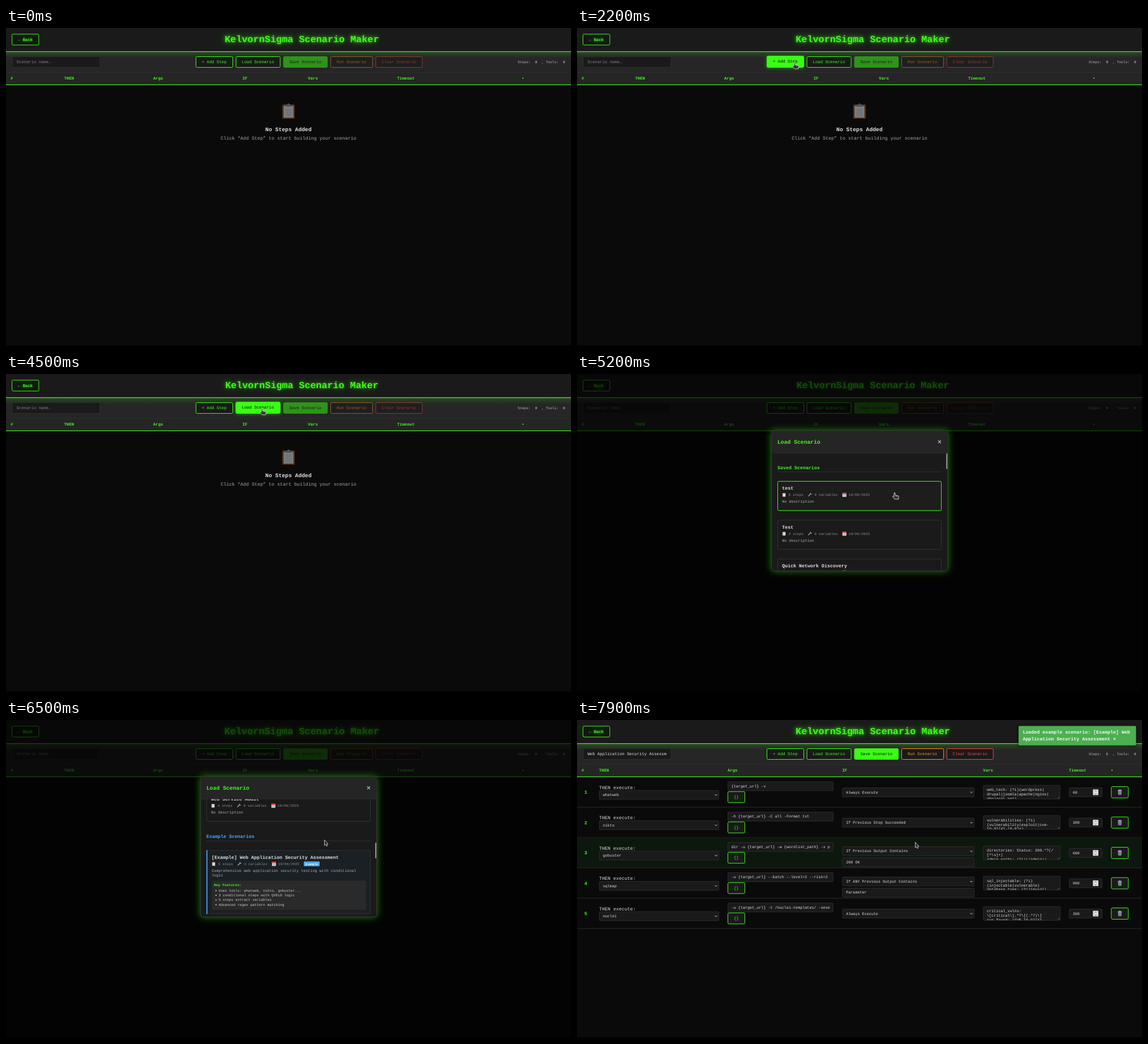
These frames come from a looping animation (998x561 px, 8000 ms). An HTML page:

```html
<!DOCTYPE html>
<html lang="en">
<head>
<meta charset="utf-8">
<title>Scenario Maker</title>
<style>
html, body { margin: 0; width: 100%; height: 100%; overflow: hidden; background: #0a0a0a; }
#stage { display: block; width: 100vw; height: 100vh; }
text { font-family: "Liberation Mono", "Courier New", monospace; white-space: pre; text-rendering: geometricPrecision; }
</style>
</head>
<body>
<svg id="stage" viewBox="0 0 998 561"></svg>
<script>
const GREEN = '#39ff14', BLUE = '#4aa8ff', LIGHT = '#e0e0e0', DARK = '#1a1a1a', EDGE = '#333';
const LOOP = 8000, STEP = 100;
const OPEN = 4750, LOADED = 7650, SCROLL_START = 5500;
const SIZE = { tag: 5.2, tiny: 6.24, small: 6.76, base: 7.28, body: 8.32, head: 9.73, title: 16.64 };

// Text is placed by its left edge and the middle of its capitals.
const text = (x, cy, str, size, fill, extra = '') =>
  `<text x="${x}" y="${cy + size * .31}" font-size="${size}" fill="${fill}" ${extra}>${
    str.replace(/&/g, '&amp;').replace(/</g, '&lt;')}</text>`;
const bold = (x, cy, str, size, fill, extra = '') => text(x, cy, str, size, fill, 'font-weight="700" ' + extra);
const rect = (x, y, w, h, fill, extra = '') =>
  `<rect x="${x}" y="${y}" width="${w}" height="${h}" fill="${fill}" ${extra}/>`;
const box = (x, y, w, h, fill, stroke, r = 2, sw = 1) =>
  rect(x + sw / 2, y + sw / 2, w - sw, h - sw, fill, `stroke="${stroke}" stroke-width="${sw}" rx="${r}"`);
const path = (d, stroke, sw, fill = 'none') =>
  `<path d="${d}" stroke="${stroke}" stroke-width="${sw}" fill="${fill}" stroke-linejoin="round"/>`;
const group = (id, body, extra = '') => `<g id="${id}" ${extra}>${body}</g>`;
const clip = (x, y, w, h, body) =>
  `<svg x="${x}" y="${y}" width="${w}" height="${h}" viewBox="${x} ${y} ${w} ${h}">${body}</svg>`;

const button = (x, w, label, color, fill = DARK, ink = color) =>
  box(x, 50, w, 20, fill, color) + text(x + 10.9, 60, label, SIZE.base, ink);
const hoverButton = (id, x, w, label) => button(x, w, label, GREEN) +
  group(id, rect(x, 52, w, 20, GREEN, 'opacity=".4" filter="url(#soft)"') +
    button(x, w, label, GREEN, GREEN, '#0a0a0a'));

const clipboard = (x, y, s) => `<g transform="translate(${x} ${y}) scale(${s})">` +
  rect(0, 2, 22, 25, '#9a5a33', 'rx="1.5"') + rect(2.5, 4.5, 17, 20.5, '#e6e9ec') +
  path('M5 10H17M5 13H17M5 16H17M5 19H17M5 22H17', '#9aa4ab', .8) +
  rect(5.5, 2, 11, 4, '#8a949b', 'rx="1"') + '<circle cx="11" cy="2" r="2" fill="#8a949b"/></g>';
const wrench = (x, y) => path(`M${x} ${y + 6}L${x + 4} ${y + 2}`, '#8fa3ad', 1.5) +
  path(`M${x + 4} ${y}V${y + 2.3}H${x + 6.5}`, '#8fa3ad', 1.3);
const calendar = (x, y) => rect(x, y, 7, 7, '#dfe3e6', 'rx=".6"') + rect(x, y, 7, 2.2, '#d9403a', 'rx=".6"') +
  path(`M${x + 1.2} ${y + 3.8}h4.6M${x + 1.2} ${y + 5.4}h4.6`, '#7d878d', .7);
const trash = (x, y) => rect(x - 3.5, y - 4, 7, 1.4, '#a9b4ba', 'rx=".5"') + rect(x - 1.2, y - 5, 2.4, 1.2, '#a9b4ba') +
  path(`M${x - 2.9} ${y - 2}h5.8l-.6 6h-4.6z`, '#a9b4ba', .7, '#5f6b72') +
  path(`M${x - 1} ${y - 1}v4M${x + 1} ${y - 1}v4`, '#a9b4ba', .6);

const heads = (xs, dot) => ['#', 'THEN', 'Args', 'IF', 'Vars', 'Timeout']
  .map((s, i) => bold(xs[i], 88.6, s, SIZE.base, GREEN)).join('') +
  `<circle cx="${dot}" cy="88.6" r="1.1" fill="${GREEN}"/>`;

// Page
const title = 'KelvornSigma Scenario Maker';
const titleText = extra => bold(522.5, 20.2, title, SIZE.title, GREEN, 'text-anchor="middle" ' + extra);
const header = rect(0, 0, 998, 41, DARK) + rect(0, 42, 998, 37, '#262626') +
  rect(0, 42, 998, 11, 'url(#fall)') + rect(0, 41, 998, 1.2, GREEN) + rect(0, 78, 998, .7, EDGE) +
  rect(0, 79, 998, 21, '#252525') + rect(0, 99.6, 998, 1.2, GREEN) + rect(0, 560, 998, 1, '#000') +
  box(10, 10.3, 48.4, 20.2, '#151515', GREEN) +
  bold(21, 20.5, '← Back', SIZE.base, GREEN, 'filter="url(#near)" opacity=".6"') +
  bold(21, 20.5, '← Back', SIZE.base, GREEN) +
  group('title', titleText('id="glowWide" filter="url(#wide)"') + titleText('id="glowNear" filter="url(#near)"') + titleText(''));
const toolbar = box(10.5, 50, 156, 20, DARK, '#2e2e2e') +
  hoverButton('addHover', 335, 66, '+ Add Step') + hoverButton('loadHover', 405.7, 79, 'Load Scenario') +
  group('lockable', button(489.6, 78.6, 'Save Scenario', GREEN, GREEN, '#0a0a0a') +
    button(573, 75, 'Run Scenario', '#ff9020') + button(652.7, 83, 'Clear Scenario', '#ff4444')) +
  text(904, 59.8, 'Steps:', SIZE.tiny, '#bbb') + text(946, 59.8, ', Tools:', SIZE.tiny, '#bbb') +
  text(984, 59.8, '0', SIZE.tiny, '#ddd');
const empty = text(18.5, 60, 'Scenario name…', SIZE.base, '#808080') + text(934.5, 59.8, '0', SIZE.tiny, '#ddd') +
  heads([8, 102.7, 260, 417.7, 533.3, 691], 913) +
  `<g opacity=".52">${clipboard(488, 133, 1)}</g>` +
  bold(458.1, 178.6, 'No Steps Added', SIZE.head, LIGHT) +
  text(379.2, 194.6, 'Click “Add Step” to start building your scenario', SIZE.body, '#a8a8a8');

// Loaded table
const raw = String.raw;
const ROWS = [
  ['whatweb', '{target_url} -v', 'Always Execute', '', 60,
    [raw`web_tech: (?i)(wordpress|`, raw`drupal|joomla|apache|nginx|`, raw`php|asp\.net)`]],
  ['nikto', '-h {target_url} -C all -Format txt', 'If Previous Step Succeeded', '', 300,
    [raw`vulnerabilities: (?i)`, raw`(vulnerability|exploit|cve-`, raw`[0-9]{4}-[0-9]+)`]],
  ['gobuster', 'dir -u {target_url} -w {wordlist_path} -x p', 'If Previous Output Contains', '200 OK', 600,
    [raw`directories: Status: 200.*?(/`, raw`[^\s]+)`, raw`admin_paths: (?i)(/admin|/`]],
  ['sqlmap', '-u {target_url} --batch --level=2 --risk=2', 'If ANY Previous Output Contains', 'Parameter', 900,
    [raw`sql_injectable: (?i)`, raw`(injectable|vulnerable)`, raw`database_type: (?i)(mysql|`]],
  ['nuclei', '-u {target_url} -t /nuclei-templates/ -seve', 'Always Execute', '', 300,
    [raw`critical_vulns:`, raw`\[critical\].*?\[(.*?)\]`, raw`cve_found: (CVE-[0-9]{4}-`]],
];
const field = (x, y, w, str) => box(x, y, w, 16.6, DARK, EDGE, 1.5, .8) + text(x + 6.7, y + 8.3, str, SIZE.small, LIGHT);
const select = (x, y, w, str) => field(x, y, w, str) +
  path(`M${x + w - 7.4} ${y + 7.4}l2 2 2-2`, LIGHT, 1);
const tableRow = ([tool, args, cond, value, timeout, vars], i) => {
  const y = 100.6 + i * 53.5;
  return (i === 2 ? rect(0, y, 998, 53, '#0c170d') : '') +
    rect(0, y + 52.8, 998, .8, EDGE) +
    bold(13, y + 27, String(i + 1), SIZE.body, GREEN) +
    text(39, y + 18.4, 'THEN execute:', SIZE.body, LIGHT) + select(39, y + 23.2, 212, tool) +
    field(266, y + 8, 187, args) + box(266, y + 25.2, 31, 20.4, DARK, GREEN) +
    text(277, y + 35.3, '{}', SIZE.base, GREEN) +
    select(468.5, y + (value ? 15.5 : 18.6), 233.5, cond).replace(/^/, '') .replace(/$/, '') +
    (value ? field(468.5, y + 35, 233.5, value) : '') +
    box(717.3, y + 14.2, 136.5, 25, DARK, EDGE, 1.5, .8) +
    clip(718, y + 15, 135, 23.6, vars.map((s, n) => text(724, y + 22.6 + n * 7.8, s, SIZE.small, LIGHT)).join('')) +
    path(`M849 ${y + 38}l3.5-3.5M851 ${y + 38}l1.5-1.5`, '#888', .6) +
    field(869, y + 18.6, 59, String(timeout)) + rect(911.3, y + 22, 9.6, 10, '#dedede', 'rx=".6"') +
    path(`M914.5 ${y + 25.4}l1.6-1.6 1.6 1.6M914.5 ${y + 28.8}l1.6 1.6 1.6-1.6`, '#555', .8) +
    box(943.3, y + 16.4, 31, 21, DARK, GREEN) + trash(958.8, y + 27);
};
const loaded = text(18.5, 60, 'Web Application Security Assessm', SIZE.base, LIGHT) +
  text(934.5, 59.8, '5', SIZE.tiny, '#ddd') + heads([8, 39, 266, 468.5, 717.3, 869], 945) +
  ROWS.map(tableRow).join('') +
  group('toast', rect(780, 12, 207.5, 34, '#000', 'opacity=".5" filter="url(#soft)"') +
    rect(780, 10.5, 207.5, 34.2, '#4caf50', 'rx="2"') +
    bold(787.4, 21.5, 'Loaded example scenario: [Example] Web', SIZE.body, '#f2faf2') +
    bold(787.4, 33.4, 'Application Security Assessment ×', SIZE.body, '#f2faf2'));

// Dialog
const SAVED = [['test', 0], ['Test', 2], ['Quick Network Discovery', 3], ['Port Sweep', 2],
  ['Host Inventory', 3], ['Service Check', 4], ['Web Service Audit', 4]];
const EXAMPLES = [
  { y: 702.5, h: 113, name: 'Web Application Security Assessment', count: 3, tools: 'whatweb, nikto, gobuster...',
    lines: ['Comprehensive web application security testing with conditional', 'logic'] },
  { y: 831.5, h: 106, name: 'Network Infrastructure Reconnaissance', count: 4, tools: 'nmap, masscan, enum4linux...',
    lines: ['Systematic network discovery and service enumeration'] },
];
const cards = [...SAVED.map((s, i) => ({ y: 188.8 + i * 68.5, h: 52.6 })), ...EXAMPLES];
const meta = (x, cy, steps, vars) => clipboard(x + .6, cy - 3.8, .27) + text(x + 11.6, cy, steps + ' steps', SIZE.tiny, '#8c8c8c') +
  wrench(x + 46.2, cy - 3.4) + text(x + 57.2, cy, vars + ' variables', SIZE.tiny, '#8c8c8c') +
  calendar(x + 106.6, cy - 3.5) + text(x + 117.6, cy, '10/06/2025', SIZE.tiny, '#8c8c8c');
const savedCard = ([name, steps], i) => {
  const { y, h } = cards[i];
  return box(354, y, 290, h, DARK, EDGE) + group('hover' + i, box(354, y, 290, h, '#1c1d1c', GREEN)) +
    bold(362.2, y + 13, name, SIZE.body, LIGHT) + meta(362.2, y + 24.4, steps, 0) +
    text(362.2, y + 36.3, 'No description', SIZE.small, '#b0b0b0');
};
const exampleCard = ({ y, h, name, count, tools, lines }, i) => {
  const top = y + 37.8 + lines.length * 8.1;
  const features = ['Uses tools: ' + tools, count + ' conditional steps with QVELD logic',
    '5 steps extract variables', 'Advanced regex pattern matching'];
  return box(354, y, 290, h, '#1a2023', EDGE) +
    group('hover' + (SAVED.length + i), box(354, y, 290, h, '#1b252d', BLUE)) +
    rect(354, y, 1.7, h, BLUE, 'rx=".8"') +
    bold(363.2, y + 12.8, '[Example] ' + name, SIZE.body, LIGHT) + meta(363.2, y + 24.4, 5, 3) +
    rect(526, y + 20, 28, 8.6, BLUE, 'rx="1.2"') + bold(529.1, y + 24.4, 'Example', SIZE.tag, '#fff') +
    lines.map((s, n) => text(363.2, y + 36.9 + n * 8, s, SIZE.small, '#a8b0b4')).join('') +
    rect(363.2, top, 272.8, 51.5, '#2a2a2a', 'rx="2"') +
    bold(367.3, top + 7.4, 'Key Features:', SIZE.tiny, GREEN) +
    features.map((s, n) => `<circle cx="371" cy="${top + 17.4 + n * 8.3}" r="1.1" fill="#ccc"/>` +
      text(375.4, top + 17.3 + n * 8.3, s, SIZE.tiny, '#ccc')).join('');
};
const section = (cy, label, color) => bold(354, cy, label, SIZE.body, color) + rect(354, cy + 7.5, 290, .7, '#3a3a3a');
const dialog = rect(343.5, 100, 311.5, 247.5, GREEN, 'opacity=".5" filter="url(#halo)"') +
  box(343.3, 99.6, 312, 248.2, DARK, '#3a3a3a', 4) +
  path('M344 139V103.5Q344 100.2 347.5 100.2H651.5Q655 100.2 655 103.5V139Z', 'none', 0, '#252525') +
  rect(344, 139, 311, .7, EDGE) + bold(354, 119.5, 'Load Scenario', SIZE.head, GREEN) +
  path('M638 117.2l5 5m0-5l-5 5', '#ccc', 1.1) +
  clip(344, 139.7, 310.5, 207.3, group('list', section(165, 'Saved Scenarios', GREEN) + SAVED.map(savedCard).join('') +
    section(678.3, 'Example Scenarios', BLUE) + EXAMPLES.map(exampleCard).join(''))) +
  rect(652.2, 140.2, 2, 27.6, '#9a9a9a', 'id="thumb" rx=".8"');

const cursor = group('cursor',
  group('arrow', path('M.5 .5V10.2L2.6 8.6 4 11.6 5.7 10.8 4.5 7.8H7Z', '#cfcfcf', .9, '#262626')) +
  group('hand', path('M-1 1Q0-.6 1 1V4.6L6.4 6Q7.6 6.4 7.4 8L6.6 12H.4L-3.6 7.6Q-3.6 6 -2.2 6.4L-1 7.4Z', '#d8d8d8', .9, '#333') +
    path('M2.6 5.2V7.4M4.6 5.7V7.6', '#d8d8d8', .6)));

const blur = (id, dev) => `<filter id="${id}" x="-50%" y="-200%" width="200%" height="500%"><feGaussianBlur stdDeviation="${dev}"/></filter>`;
const stage = document.getElementById('stage');
stage.innerHTML = '<defs>' + blur('wide', 6) + blur('near', 2.4) + blur('soft', 3) + blur('halo', 7) +
  `<linearGradient id="fall" x2="0" y2="1"><stop stop-color="${GREEN}" stop-opacity=".17"/><stop offset="1" stop-color="${GREEN}" stop-opacity="0"/></linearGradient></defs>` +
  rect(0, 0, 998, 561, '#0a0a0a') + header + toolbar + group('empty', empty) + group('loaded', loaded) +
  rect(0, 0, 998, 561, '#000', 'id="shade"') + group('dialog', dialog) + cursor;

// Motion
const el = {};
stage.querySelectorAll('[id]').forEach(node => el[node.id] = node);
const set = (id, name, value) => el[id].setAttribute(name, value);
const show = (id, on) => set(id, 'display', on ? 'inline' : 'none');
const clamp = v => Math.min(1, Math.max(0, v));
const smooth = v => v * v * (3 - 2 * v);
const ramp = (t, start, length) => smooth(clamp((t - start) / length));
function track(keys, t) {
  let value = keys[0].slice(1);
  for (let i = 1; i < keys.length; i++) {
    const p = ramp(t, keys[i - 1][0], keys[i][0] - keys[i - 1][0]);
    value = value.map((v, n) => v + (keys[i][n + 1] - keys[i - 1][n + 1]) * p);
  }
  return value;
}
const POINTER = [[100, 640, 484], [1000, 509, 127], [1800, 384, 60], [3800, 384, 60], [4300, 452, 60],
  [4800, 452, 60], [5150, 561, 209], [6500, 562, 211], [7200, 597, 215]];
const SCROLL = [[SCROLL_START, 0], [6450, 473], [6650, 473], [7350, 591.5]];

function draw(t) {
  const pulse = (1 - Math.cos((t - 1100) / 2000 * Math.PI)) / 2;
  set('title', 'transform', `translate(522.5 20.5) scale(${1 + .02 * pulse}) translate(-522.5 -20.5)`);
  set('glowWide', 'opacity', .2 + .7 * pulse);
  set('glowNear', 'opacity', .45 + .2 * pulse);

  const isLoaded = t >= LOADED, isOpen = t >= OPEN && !isLoaded;
  const [x, y] = track(POINTER, t), [scroll] = track(SCROLL, t);
  const fade = ramp(t, OPEN, 250);

  const add = ramp(t, 1700, 200) - ramp(t, 3950, 200);
  const load = ramp(t, 4100, 200) - ramp(t, OPEN, 200);
  for (const [id, p] of [['addHover', add], ['loadHover', load]]) {
    set(id, 'opacity', p);
    set(id, 'transform', `translate(0 ${-p})`);
  }

  show('empty', !isLoaded);
  show('loaded', isLoaded);
  set('lockable', 'opacity', isLoaded ? 1 : .5);
  const toast = ramp(t, LOADED, 200);
  set('toast', 'opacity', toast);
  set('toast', 'transform', `translate(${(1 - toast) * 60} 0)`);

  show('dialog', isOpen);
  show('shade', isOpen);
  set('shade', 'opacity', .7 * fade);
  set('dialog', 'opacity', fade);
  set('dialog', 'transform', `translate(0 ${(fade - 1) * 10})`);
  set('list', 'transform', `translate(0 ${-scroll})`);
  set('thumb', 'y', 140.2 + scroll / 6.2);

  let onCard = false;
  cards.forEach((card, i) => {
    const top = card.y - scroll;
    const over = isOpen && x > 354 && x < 644 && y > 140 && y > top && y < top + card.h;
    show('hover' + i, over);
    onCard = onCard || over;
  });

  const hand = t < SCROLL_START && (onCard || add > .5 || load > .5);
  show('cursor', t >= STEP);
  show('hand', hand);
  show('arrow', !hand);
  set('cursor', 'transform', `translate(${x} ${y})`);
}

const start = performance.now();
function tick() {
  const t = (performance.now() - start) % LOOP;
  draw(Math.floor(t / STEP) * STEP);
  requestAnimationFrame(tick);
}
draw(0);
requestAnimationFrame(tick);
</script>
</body>
</html>
```
